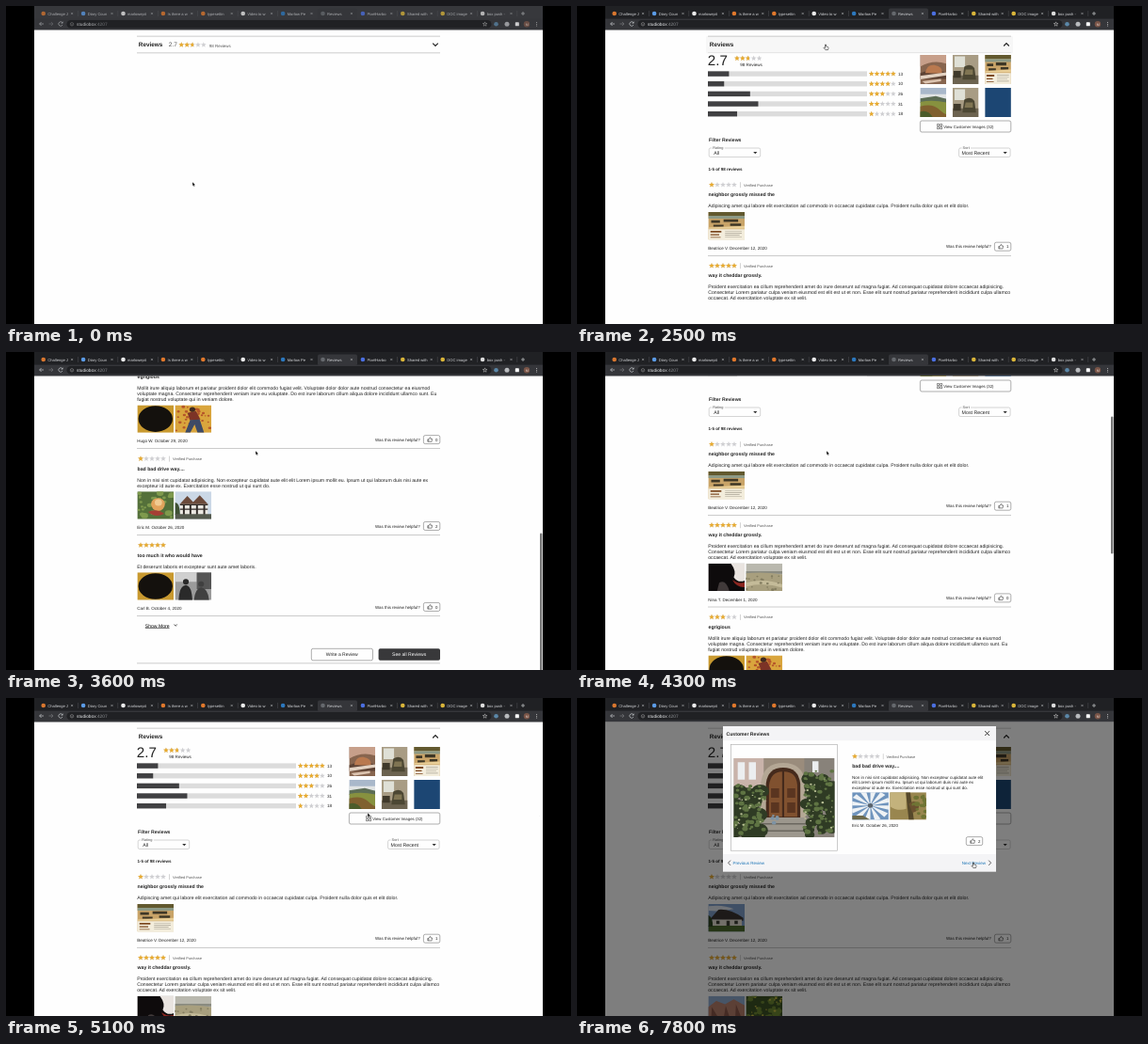
Animation of 600x338 px, one loop 8 s. Source, as an HTML page:

```html
<!DOCTYPE html>
<html lang="en">
<head>
<meta charset="utf-8">
<title>Reviews</title>
<style>
html, body { margin: 0; width: 100%; height: 100%; overflow: hidden; background: #000; }
#stage { display: block; font-family: "Liberation Sans", Arial, sans-serif; text-rendering: geometricPrecision; }
.b { font-weight: bold; }
.line { fill: none; stroke: #222; stroke-width: .5; }
</style>
</head>
<body>
<svg id="stage" width="600" height="338" viewBox="0 0 600 338"></svg>
<script>
(() => {
const text = (x, y, size, str, fill = '#222', more = '') =>
  `<text x="${x}" y="${y}" font-size="${size}" fill="${fill}" ${more}>${str}</text>`;
const bold = (x, y, size, str) => text(x, y, size, str, '#222', 'class="b"');
const rect = (x, y, w, h, fill, more = '') =>
  `<rect x="${x}" y="${y}" width="${w}" height="${h}" fill="${fill}" ${more}/>`;
const path = (d, more = '') => `<path class="line" d="${d}" ${more}/>`;
const box = (x, y, w, h, fill = 'none') => rect(x, y, w, h, fill, 'rx="1.8" stroke="#777" stroke-width=".6"');
const rule = y => rect(139, y, 322, .6, '#aaa');
const dot = (x, y, r, fill) => `<circle cx="${x}" cy="${y}" r="${r}" fill="${fill}"/>`;
const group = (name, body) => `<g class="${name}">${body}</g>`;
const each = (list, fn) => list.map(fn).join('');

// Stars: a grey row under a gold row cut off at the score
const starPoints = Array.from({ length: 10 }, (_, i) => {
  const r = i % 2 ? .42 : 1, a = i * Math.PI / 5;
  return `${(Math.sin(a) * r).toFixed(3)},${(-Math.cos(a) * r).toFixed(3)}`;
}).join(' ');
const starRow = (pitch, fill) => each([0, 1, 2, 3, 4], i =>
  `<polygon points="${starPoints}" fill="${fill}" transform="translate(${(i + .5) * pitch} 3.2) scale(${pitch * .52})"/>`);
const stars = (x, y, score, pitch = 6) =>
  `<svg x="${x}" y="${y - 3.2}" width="${5 * pitch}" height="7">${starRow(pitch, '#cfcfd2')}</svg>` +
  `<svg x="${x}" y="${y - 3.2}" width="${score * pitch}" height="7">${starRow(pitch, '#e9ab2e')}</svg>`;

// Photos: a ground colour, then "colour path" layers in a 100 x 100 field
const specks = (n, seed, x, y, w, h, r) => {
  const rnd = () => (seed = seed * 16807 % 2147483647) / 2147483647;
  let d = '';
  for (rnd(); n--;) {
    const q = (r * (.5 + rnd())).toFixed(1);
    d += `M${(x + w * rnd()).toFixed(1)} ${(y + h * rnd()).toFixed(1)}m-${q} 0a${q} ${q} 0 1 0 ${2 * q} 0a${q} ${q} 0 1 0 ${-2 * q} 0`;
  }
  return d;
};
const blades = each([...Array(12).keys()], i => {
  const rim = a => `${(50 + 56 * Math.cos(a)).toFixed(1)} ${(48 + 56 * Math.sin(a)).toFixed(1)}`;
  return `M50 48L${rim(i * Math.PI / 6)}L${rim(i * Math.PI / 6 + .3)}Z`;
});
const photos = {
  den: ['#87654f', '#c79f8a M0 0H100V30Q50 15 0 40Z', '#5d4335 M0 62Q40 45 100 60V82H0Z', '#b9794f M20 62Q25 32 55 35Q88 40 84 64Z', '#e3d2c2 M0 72L100 60V70L0 84Z', '#dcc4b0 M8 90L80 82V90L20 98Z'],
  room: ['#a89c84', '#dfe0d6 M8 5H48V42H8Z', '#6c6350 M0 70H100V100H0Z', '#4c4733 M45 40Q70 28 84 45L90 85H38Z', '#807553 M50 50H78V68H46Z', '#3f392a M4 55H32V78H4Z'],
  beach: ['#c9a468', '#62592f M0 0H100V14H0Z', '#8d9a86 M0 14H100V24H0Z', '#3e3726 M8 30h24v9H8zM42 26h40v10H42zM60 42h30v8H60zM14 46h28v7H14z', '#e9cf98 M0 56L100 50V60H0Z', '#f3eddc M0 62H100V100H0Z', '#7d4a22 M6 68H36V74H6ZM6 80h24v4H6zM6 90h28v3H6z', '#a8a294 M46 68h46v2H46zM46 75h46v2H46zM46 82h40v2H46zM46 89h46v2H46z'],
  field: ['#a9b8ca', '#e1e4e4 M0 22H100V36H0Z', '#5c6d55 M0 36L60 28L100 38V52H0Z', '#87913f M0 48Q50 40 100 50V100H0Z', '#80602f M0 64Q45 52 70 72T100 90V100H0Z', '#4b5c2a M0 82Q30 74 48 100H0Z'],
  badge: ['#1c4673'],
  mask: ['#0e0b0c', '#e9e4e0 M62 0H100V62Q82 72 70 50Q78 28 62 0Z', '#8d2620 M66 60Q84 76 100 68V86Q78 88 66 60Z', '#413a3a M30 70Q48 55 58 100H24Z'],
  coast: ['#b9b8ae', '#8a8b80 M0 28H100V38H0Z', '#a89f7e M0 36Q50 30 100 40V100H0Z', '#c4bb99 M0 70Q50 52 100 76V88Q50 66 0 84Z', '#837d60 ' + specks(18, 11, 0, 45, 100, 50, 3)],
  seal: ['#c8992f', '#14110d M50 3A47 47 0 0 1 50 97A47 47 0 0 1 50 3Z'],
  dancer: ['#d9a53d', '#b5562a ' + specks(34, 5, 0, 0, 100, 100, 3.5), '#7c3326 M34 28L58 22L70 52L42 56Z', '#3d4a66 M42 54L68 52L80 100H62L54 70L42 100H28Z', '#402a20 M40 16a8 9 0 1 1 16 0a8 9 0 1 1 -16 0'],
  flower: ['#54703a', '#7f9a4d ' + specks(24, 8, 0, 0, 100, 100, 7), '#e2a35c M38 45a18 20 0 1 1 38 0a18 24 0 1 1 -38 0', '#f0cb92 M48 40a9 11 0 1 1 20 0a9 11 0 1 1 -20 0', '#a53f35 M30 74Q52 60 74 80Q50 98 30 74Z'],
  manor: ['#cbd8e6', '#6b4a3b M12 48L34 16L50 38L68 14L92 48Z', '#ebe8e2 M14 46H90V84H14Z', '#2f2926 M14 46h76v4H14zM14 62h76v4H14zM22 46h5v38h-5zM40 46h5v38h-5zM58 46h5v38h-5zM78 46h5v38h-5z', '#3f5134 M0 40Q14 40 14 84H0Z', '#555a4e M0 82H100V100H0Z'],
  crowd: ['#9b9b9b', '#d0d0d0 M0 0H60V34H0Z', '#555 M60 0H100V60H60Z', '#2a2a2a M10 100Q12 48 30 46Q46 48 48 100ZM22 34a8 10 0 1 1 16 0a8 10 0 1 1 -16 0', '#404040 M52 100Q56 56 72 54Q90 58 94 100ZM64 42a8 10 0 1 1 16 0a8 10 0 1 1 -16 0'],
  cottage: ['#7f9fcb', '#dfe5ee M0 8Q40 0 70 18Q40 28 0 24Z', '#3a3532 M4 56L28 20Q60 16 96 50V60Z', '#e5e0d3 M10 56H92V80H10Z', '#3a3c33 M22 60h9v12h-9zM50 60h9v20h-9zM72 60h9v12h-9z', '#4d6b2f M0 78H100V100H0Z', '#2f4423 M0 40Q14 50 12 82H0Z'],
  rock: ['#8fabd0', '#b9806c M0 40L22 18L46 30L70 12L100 34V82H0Z', '#8b5648 M10 40L28 80H8ZM48 36L60 82H42ZM76 30L92 82H74Z', '#657048 M0 80Q50 70 100 82V100H0Z'],
  hedge: ['#3d5225', '#6f8a33 ' + specks(40, 21, 0, 0, 100, 100, 6), '#c9bd45 ' + specks(24, 3, 0, 0, 100, 100, 3)],
  wheel: ['#6f94bd', '#eef2f5 ' + blades, '#59636c M43 48a7 8 0 1 1 14 0a7 8 0 1 1 -14 0', '#6d6a4c M0 84H30L50 100H0Z'],
  perch: ['#99864f', '#c3b27c M0 0H45V60Q20 70 0 50Z', '#55482a M44 0L56 0L66 100H52Z', '#6b5130 M52 42Q66 24 80 44Q82 66 62 74Z', '#6f7434 ' + specks(14, 9, 60, 0, 40, 100, 6)],
  door: ['#88827a', '#c9b3aa M0 0H30V38H0Z', '#9a8c7c M30 0H70V20H30Z', '#eceef0 M4 5h7v22H4zM15 5h7v22h-7zM78 4h6v14h-6z', '#b4a795 M27 76V30Q30 6 49 6T71 30V76Z', '#452a1c M32 76V32Q34 12 49 12T66 32V76Z', '#80512f M35 74V34Q37 17 48 17V74ZM50 74V17Q62 17 63 34V74Z', '#5a3520 M37 38h8v12h-8zM53 38h8v12h-8zM37 56h8v13h-8zM53 56h8v13h-8z',
    '#9c978d M30 75H70L78 100H22Z', '#6b675f M28 82H72V84H28ZM25 91H75V93H25Z', '#2f3b24 ' + specks(55, 4, 0, 38, 27, 60, 6) + specks(55, 6, 72, 20, 28, 78, 6), '#5f7443 ' + specks(60, 14, 0, 34, 30, 62, 2) + specks(60, 17, 70, 16, 30, 80, 2), '#b9bf95 ' + specks(22, 31, 2, 40, 32, 50, .9) + specks(22, 37, 68, 20, 30, 70, .9), '#7d93a5 ' + specks(5, 12, 38, 70, 8, 12, 2)]
};
const pic = (x, y, w, h, name) => {
  const [ground, ...layers] = photos[name];
  return `<svg x="${x}" y="${y}" width="${w}" height="${h}" viewBox="0 0 100 100" preserveAspectRatio="none">` +
    rect(0, 0, 100, 100, ground) +
    each(layers, s => { const i = s.indexOf(' '); return `<path fill="${s.slice(0, i)}" d="${s.slice(i + 1)}"/>`; }) + '</svg>';
};
const pair = (x, y, names) => each(names, (n, i) => pic(x + i * 40, y, 38.7, 29.4, n));

// Browser window
const tabs = [['Challenge J', '#d9772f'], ['Diary Coun', '#5b9be6'], ['marlowepit', '#eee'], ['Is there a w', '#e0782c'],
  ['typesettin', '#e0782c'], ['Video to w', '#eee'], ['Marlow Pe', '#2c78be'], ['Reviews', '#66696e'],
  ['PixelHarbo', '#4b6fe0'], ['Shared with', '#d9b53a'], ['DOC image', '#d9b53a'], ['box push -', '#ddd']];
const tab = ([name, colour], i) => {
  const x = 39.7 + i * 42.4;
  return dot(x, 8, 2.3, colour) +
    `<svg x="${x + 4.6}" y="3" width="22.5" height="10">${text(0, 6.5, 4.1, name, '#d5d7da')}</svg>` +
    path(`M${x + 29.3} 6.9l2.2 2.2m0-2.2l-2.2 2.2`, 'style="stroke:#b8babd"') +
    rect(x + 36.6, 5, .4, 6, i === 6 || i === 7 ? 'none' : '#5c5e62');
};
const pale = 'style="stroke:#c5c7ca;stroke-width:.7"';
const toolbar = rect(30, 0, 540, 26, '#202124', 'class="strip"') + rect(331, 2.5, 42, 12, '#35363a', 'rx="2"') +
  rect(30, 13.6, 540, 12, '#35363a') + rect(64.5, 15, 451, 8.6, '#202124', 'rx="4.3"') +
  group('labels', each(tabs, tab) + path('M547 8h4m-2-2v4', pale) +
    path('M40 19h-4.4m2-2l-2 2 2 2', pale) + path('M45.5 19h4.4m-2-2l2 2-2 2', 'style="stroke:#77797c;stroke-width:.7"') +
    path('M60 18a2.2 2.2 0 1 0 0 2M60.2 16.6v1.6h-1.6', pale) +
    path('M68.3 19.3a1.7 1.7 0 1 0 3.4 0a1.7 1.7 0 1 0-3.4 0M70 19v1.2', 'style="stroke:#aaa"') +
    text(75, 21, 4.8, 'studiobox<tspan fill="#8f9296">:4207</tspan>', '#eceef0') +
    `<polygon points="${starPoints}" transform="translate(508.6 19.3) scale(2.4)" fill="none" stroke="#ccc" stroke-width=".22"/>` +
    dot(520.5, 19.3, 2.3, '#5b87a8') + dot(532, 19.3, 2.5, '#b9bbbe') + rect(540.8, 17.3, 4, 4, '#fff', 'rx=".6"') +
    dot(553, 19.3, 3.2, '#7a5548') + text(551.8, 20.7, 3.6, 'M', '#e8d8d0') + each([17.5, 19.3, 21.1], y => dot(563.5, y, .5, '#ccc')));

// Page
const vote = (x, y, n) => box(x, y, 17.4, 9) + text(x + 12.6, y + 6.1, 4.4, n) +
  path('M-2.4-.3h1v2.5h-1zM-1.4-.2L.2-2.4q.9 0 .5 1.7h1.7L1.9 2.2H-1.4', `transform="translate(${x + 6.8} ${y + 4.5})"`);
const verified = (x, y) => rect(x, y - 2.8, .4, 6, '#999') + text(x + 3.6, y + 1.5, 3.93, 'Verified Purchase', '#555');
const select = (x, label, value, indent) => rect(x, 151, 54.5, 9.5, 'none', 'rx="1.6" stroke="#aaa" stroke-width=".5"') +
  rect(x + 3, 149, label.length * 2.1 + 1, 4, '#fefefe') + text(x + 4, 152.2, 3.9, label, '#555') +
  text(x + indent, 158, 5.26, value) + `<path d="M${x + 47} 155h4.2l-2.1 2.2z" fill="#333"/>`;

const reviews = [
  { score: 1, title: 'neighbor grossly missed the', by: 'Beatrice V. December 12, 2020', votes: 1, pics: ['beach'], late: ['cottage'],
    lines: ['Adipiscing amet qui labore elit exercitation ad commodo in occaecat cupidatat culpa. Proident nulla dolor quis et elit dolor.'] },
  { score: 5, title: 'way it cheddar grossly.', by: 'Nina T. December 1, 2020', votes: 0, pics: ['mask', 'coast'], late: ['rock', 'hedge'], slow: true,
    lines: ['Proident exercitation ea cillum reprehenderit amet do irure deserunt ad magna fugiat. Ad consequat cupidatat dolore occaecat adipisicing.',
      'Consectetur Lorem pariatur culpa veniam eiusmod est elit est ut et non. Esse elit sunt nostrud pariatur reprehenderit incididunt culpa ullamco',
      'occaecat. Ad exercitation voluptate ex sit velit.'] },
  { score: 3, title: 'egrigious', by: 'Hugo W. October 29, 2020', votes: 0, pics: ['seal', 'dancer'],
    lines: ['Mollit irure aliquip laborum et pariatur proident dolor elit commodo fugiat velit. Voluptate dolor dolor aute nostrud consectetur ea eiusmod',
      'voluptate magna. Consectetur reprehenderit veniam irure eu voluptate. Do est irure laborum cillum aliqua dolore incididunt ullamco sunt. Eu',
      'fugiat nostrud voluptate qui in veniam dolore.'] },
  { score: 1, title: 'bad bad drive way....', by: 'Eric M. October 26, 2020', votes: 2, pics: ['flower', 'manor'],
    lines: ['Non in nisi sint cupidatat adipisicing. Non excepteur cupidatat aute elit elit Lorem ipsum mollit eu. Ipsum ut qui laborum duis nisi aute ex',
      'excepteur id aute ex. Exercitation esse nostrud ut qui sunt do.'] },
  { score: 5, title: 'too much it who would have', by: 'Carl B. October 4, 2020', votes: 0, pics: ['seal', 'crowd'], plain: true,
    lines: ['Et deserunt laboris et excepteur sunt aute amet laboris.'] }
];
let nextY = 190;
const review = r => {
  const y = nextY, end = y + (r.lines.length - 1) * 5.85;
  nextY = end + 86;
  return stars(140, y, r.score) + (r.plain ? '' : verified(173.5, y)) + bold(139.5, y + 12.4, 5.18, r.title) +
    each(r.lines, (s, i) => text(139.2, y + 24.3 + i * 5.85, 5.17, s)) +
    group(r.late ? 'early' + (r.slow ? ' slow' : '') : '', pair(139.4, end + 29, r.pics)) +
    (r.late ? group('late', pair(139.4, end + 29, r.late)) : '') +
    text(139.2, end + 69, 4.52, r.by) + text(392, end + 67.3, 4.45, 'Was this review helpful?') +
    vote(443.4, end + 61.2, r.votes) + rule(end + 75);
};
const gallery = ['den', 'room', 'beach', 'field', 'room', 'badge'];
const content = text(138.8, 63.3, 15.2, '2.7') + stars(167, 55.6, 2.7, 5.9) + text(173.3, 64, 4.55, '98 Reviews') +
  each([13, 10, 26, 31, 18], (n, i) => {
    const y = 72.1 + i * 10.65;
    return rect(139, y - 2.7, 169, 5.4, '#dcdcdc') + rect(139, y - 2.7, n / 98 * 169, 5.4, '#404042') +
      stars(309.8, y, 5 - i, 5.8) + text(341, y + 1.7, 4.6, n);
  }) +
  each(gallery, (n, i) => pic(364.4 + i % 3 * 34.4, 52 + (i > 2) * 35, 27.7, 31, n)) +
  box(364.4, 122, 96.4, 12) + path('M382.5 125.5h2v2h-2zM385.7 125.5h2v2h-2zM382.5 128.7h2v2h-2zM385.7 128.7h2v2h-2z') +
  text(389.2, 129.7, 4.32, 'View Customer Images (32)') +
  bold(140, 144, 5.13, 'Filter Reviews') + select(140.2, 'Rating', 'All', 5) + select(405.6, 'Sort', 'Most Recent', 3) +
  bold(139.5, 174.6, 4.5, '1-5 of 98 reviews') + each(reviews, review) +
  text(147.8, 650.5, 5.1, 'Show More', '#000', 'text-decoration="underline"') + path('M178.6 647.6l1.6 1.6 1.6-1.6', 'style="stroke-width:.8"') +
  box(324.3, 673.3, 65.2, 12.5) + text(339.8, 681.3, 5.06, 'Write a Review') +
  rect(395.6, 673.3, 65.4, 12.5, '#38383a', 'rx="1.8"') + text(410, 681.3, 5.1, 'See all Reviews', '#fff');
const chevron = 'style="stroke-width:1.2"';
const page = '<svg x="30" y="25.5" width="540" height="312.5" viewBox="30 25.5 540 312.5">' + rect(30, 25, 540, 313, '#fefefe') +
  group('scroll', group('hover', rect(137, 32, 326, 18.4, '#f7f7f7', 'rx="1"') + rect(139, 49, 322, .6, '#ddd')) +
    rule(31.8) + bold(140.8, 43.3, 6.4, 'Reviews') +
    group('closed', text(172.8, 43.4, 6.5, '2.7', '#555') + stars(183.3, 41.3, 2.7, 5.9) +
      text(215.8, 43.5, 4.45, '98 Reviews', '#555') + path('M453.2 39.7l2.8 2.8 2.8-2.8', chevron)) +
    group('open', path('M453.2 42.5l2.8-2.8 2.8 2.8', chevron)) +
    `<svg class="body" x="30" y="50" width="540" height="0"><g transform="translate(-30 -50)">${content}</g></svg>` +
    group('foot', rule(0))) +
  rect(567, 25, 2.4, 146, '#757575', 'rx="1.2" class="thumb"') + '</svg>';

// Dialog
const blue = '#1a73b5';
const modal = rect(30, 25.5, 540, 312.5, '#000', 'opacity=".5"') + rect(155, 30, 290, 154.4, '#fefefe') +
  rect(155, 30, 290, 15.4, '#f4f4f6') + rect(155, 166, 290, 18.4, '#f4f4f6') + bold(158.5, 40, 5.14, 'Customer Reviews') +
  path('M433.2 35.2l4.8 4.8m0-4.8l-4.8 4.8', 'style="stroke-width:.9"') +
  rect(163.6, 49.6, 113, 112.6, 'none', 'stroke="#aaa" stroke-width=".6"') + pic(166.4, 64, 107.2, 84, 'door') +
  stars(292, 62, 1) + verified(324.9, 62) + bold(292.2, 74.2, 5.18, 'bad bad drive way....') +
  each(['Non in nisi sint cupidatat adipisicing. Non excepteur cupidatat aute elit',
    'elit Lorem ipsum mollit eu. Ipsum ut qui laborum duis nisi aute ex',
    'excepteur id aute ex. Exercitation esse nostrud ut qui sunt do.'], (s, i) => text(292, 86 + i * 5.3, 4.5, s)) +
  group('late', pair(292.2, 100.2, ['wheel', 'perch'])) + text(292, 136.8, 4.41, reviews[3].by) + vote(413.3, 147.6, 2) +
  path('M163 172.6l-2.4 2.6 2.4 2.6', 'style="stroke-width:.7"') + text(165.6, 176.8, 4.5, 'Previous Review', blue) +
  text(408.8, 176.8, 4.5, 'Next Review', blue) + path('M437.2 172.6l2.4 2.6-2.4 2.6', 'style="stroke-width:.7"');

const cursor = group('cursor', '<path class="arrow" d="M0 0V4.4L1 3.5 1.7 5 2.5 4.6 1.8 3.2H3.2Z" fill="#000" stroke="#fff" stroke-width=".35"/>' +
  '<path class="hand" d="M-.5 0q.5-.6 1 0v2l2 .5q.7.3.5 1.2l-.5 1.9h-2.7L-2 3.4q.2-.8 1.1-.1l.4.4z" fill="#fff" stroke="#000" stroke-width=".5"/>');

const stage = document.getElementById('stage');
stage.innerHTML = toolbar + page + group('modal', modal) + cursor;

// Motion, in steps of 100 ms
const set = (name, key, value) => stage.querySelectorAll('.' + name).forEach(el => el.setAttribute(key, value));
const show = (name, on) => set(name, 'visibility', on ? 'visible' : 'hidden');
const between = (t, a, b) => t >= a && t < b;
const at = (keys, t, col = 1) => {
  const i = keys.findIndex(k => k[0] > t);
  if (i < 0) return keys[keys.length - 1][col];
  if (!i) return keys[0][col];
  const a = keys[i - 1], b = keys[i];
  return a[col] + (b[col] - a[col]) * (t - a[0]) / (b[0] - a[0]);
};
const cursorKeys = [[0, 198, 187], [100, 199, 183], [400, 226, 105], [600, 250, 48], [700, 254, 41], [1000, 254, 41], [1800, 264, 41],
  [2500, 264, 41], [2800, 265, 105], [4600, 265, 105], [4900, 350, 117], [5100, 384, 122], [5500, 391, 127], [5700, 391, 127],
  [5900, 375.5, 103], [6300, 370, 118], [6600, 366, 130], [7000, 366, 130], [7200, 405, 157], [7300, 405, 157], [7500, 429, 176],
  [7600, 429, 176], [7800, 421, 175]];
const scrollKeys = [[2700, 0], [3000, 95], [3300, 270], [3500, 350], [3600, 358], [3700, 358], [3900, 300], [4100, 190], [4300, 92], [4500, 25], [4700, 0]];
const bodyKeys = [[2000, 0], [2100, 110], [2200, 270], [2300, 639]];

function draw(now) {
  const t = Math.floor(now % 8000 / 100) * 100;
  const offset = at(scrollKeys, t), height = at(bodyKeys, t);
  const hand = between(t, 1100, 2600) || between(t, 5300, 5800) || t >= 7700;
  set('strip', 'fill', t < 900 ? '#37383c' : '#202124');
  set('labels', 'opacity', t < 900 ? .75 : 1);
  show('hover', between(t, 1100, 2600));
  show('closed', t < 2100);
  show('open', t >= 2100);
  set('body', 'height', height);
  set('foot', 'transform', `translate(0 ${49.6 + height})`);
  set('scroll', 'transform', `translate(0 ${-offset})`);
  set('thumb', 'y', 25.5 + offset * 313 / 671);
  show('thumb', between(t, 2800, 4900));
  show('early', t < 6700);
  show('slow', between(t, 2600, 6700));
  show('late', t >= 6700);
  set('modal', 'opacity', t < 5800 ? 0 : t < 5900 ? .6 : 1);
  set('cursor', 'transform', `translate(${at(cursorKeys, t)} ${at(cursorKeys, t, 2)})`);
  show('arrow', !hand);
  show('hand', hand);
}
(function loop() {
  draw(performance.now());
  requestAnimationFrame(loop);
})();
})();
</script>
</body>
</html>
```
